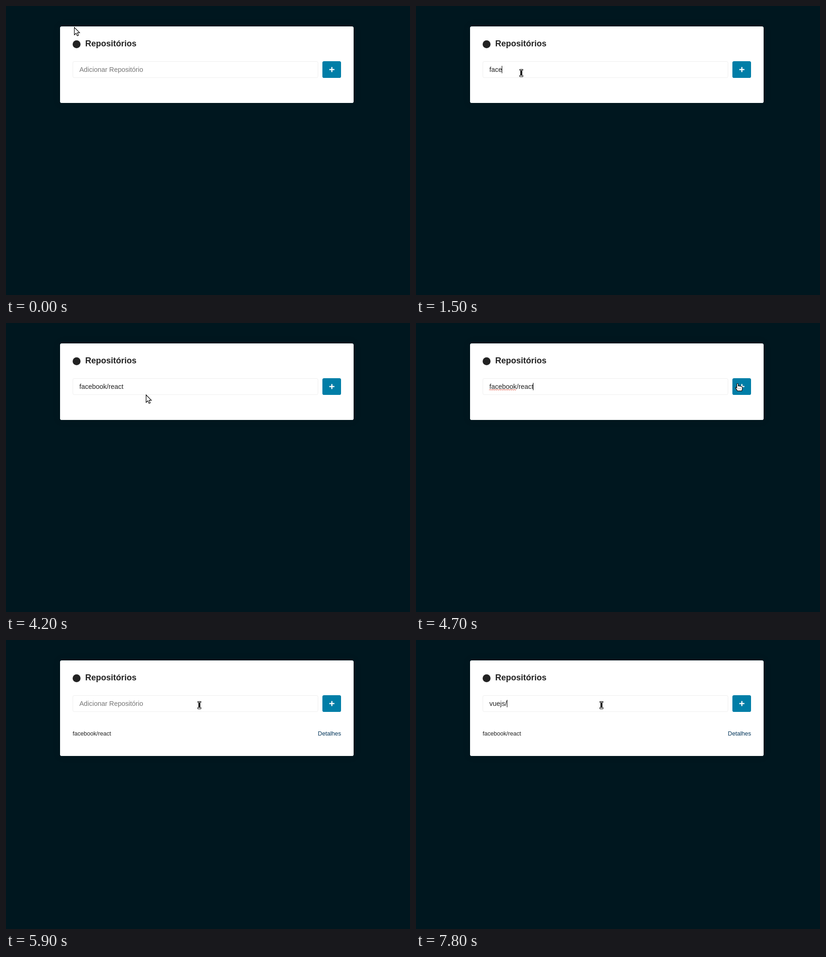
Recreate the animation shown at these times as an HTML page. Size 867x623 px, loop 8000 ms.

```html
<!DOCTYPE html>
<html lang="pt-BR">
<head>
<meta charset="utf-8">
<title>Repositórios</title>
<style>
  html, body { margin: 0; width: 100%; height: 100%; overflow: hidden; background: #00171f; }
  body { position: relative; font-family: "Liberation Sans", Arial, sans-serif; color: #222; }
  body * { position: absolute; box-sizing: border-box; margin: 0; white-space: pre; }
  svg * { position: static; }
  #card { left: 116px; top: 44px; width: 630px; height: 165px; background: #fff;
    border-radius: 3.6px; box-shadow: 0 0 18px rgba(0, 0, 0, .1); }
  #card.open { height: 206px; }
  #mark { left: 27px; top: 30px; width: 17px; height: 17px; border-radius: 50%; background: #222; }
  h1 { left: 54px; top: 27px; font-size: 18px; line-height: 20px; }
  #field { left: 27px; top: 75px; width: 527px; height: 36px; border: 1px solid #eee; border-radius: 3.6px; }
  #value { left: 41.5px; top: 85px; font-size: 14.4px; line-height: 16px; }
  #value.hint { color: #757575; }
  #caret { top: 85px; width: 1px; height: 16px; background: #000; }
  #squiggle { left: 41px; top: 98px; width: 59px; height: 4px; }
  #add { left: 563px; top: 75px; width: 40px; height: 36px; border-radius: 3.6px; background: #007ea7; }
  #add.busy { opacity: .6; }
  #add svg { left: 0; top: 0; width: 40px; height: 36px; fill: #fff; }
  #row { display: none; left: 27px; top: 151px; width: 576px; font-size: 12.6px; line-height: 14px; }
  .open #row { display: block; }
  #row a { right: 0; color: #003459; }
  #pointer { left: 0; top: 0; width: 24px; height: 24px; overflow: visible; }
</style>
</head>
<body>
<div id="card">
  <i id="mark"></i>
  <h1>Repositórios</h1>
  <div id="field"></div>
  <span id="value"></span>
  <svg id="squiggle"><path id="wave" fill="none" stroke="#e0452f" stroke-width=".9"/></svg>
  <i id="caret"></i>
  <div id="add">
    <svg>
      <g id="plus">
        <rect x="14.8" y="16.8" width="11" height="2.4" rx=".8"/>
        <rect x="19.1" y="12.5" width="2.4" height="11" rx=".8"/>
      </g>
      <g id="spinner"></g>
    </svg>
  </div>
  <div id="row">facebook/react<a>Detalhes</a></div>
</div>
<svg id="pointer">
  <g id="arrow">
    <path d="M.6 1V17.2L4.4 13.7 6.9 19.3 9.6 18.1 7.2 12.7H12Z" fill="#fff" stroke="#000" stroke-width="1.2"/>
  </g>
  <g id="beam">
    <path d="M-3.5-7.5H3.5V-5.5H1.5V5.5H3.5V8.5H-3.5V5.5H-1.5V-5.5H-3.5Z" fill="#fff" stroke="#000"/>
    <path d="M0-5.5V6" stroke="#000" stroke-width="2"/>
  </g>
  <g id="hand">
    <path d="M3.5 10V2Q3.5.5 5 .5T6.5 2V6Q8 4.8 9.3 6.3 11 5.3 12.2 7 15.4 6.3 15.4 9V12Q15.2 14 14 16.4H4.8Q3.5 13.5.8 10.5.3 8.3 2 8.5Z"
      fill="#fff" stroke="#000" stroke-width="1.2" stroke-linejoin="round"/>
    <path d="M5.5 10.5H13M5.5 12.5H13" stroke="#555" stroke-width=".8" stroke-dasharray="1 1"/>
  </g>
</svg>
<script>
const LOOP = 8000;
const $ = id => document.getElementById(id);
const show = (id, on) => { $(id).style.display = on ? '' : 'none'; };
const at = (list, t) => list.filter(e => e[0] <= t).pop();
const within = (t, a, b) => t >= a && t < b;

// Typed text: [start, value]
const typing = [
  [0, ''], [1200, 'f'], [1300, 'fa'], [1400, 'fac'], [1500, 'face'],
  [1700, 'faceb'], [1800, 'facebo'], [2000, 'facebook'], [3000, 'facebook/'],
  [3100, 'facebook/re'], [3200, 'facebook/rea'], [3300, 'facebook/reac'], [3500, 'facebook/react'],
  [5900, ''], [6800, 'v'], [7000, 'vue'], [7100, 'vuej'], [7400, 'vuejs'], [7800, 'vuejs/']
];

// Caret visibility: [from, to]
const caretOn = [[800, 2600], [3000, 4200], [4600, 5100], [6200, LOOP]];

// Pointer: [start, shape, x, y]
const moves = [[0, 'arrow', 146, 45]];
for (let k = 1; k <= 7; k++) {
  const p = k / 7, e = p * p * (3 - 2 * p);
  const y = Math.round(45 + 99 * e);
  moves.push([100 + k * 100, y > 119 ? 'beam' : 'arrow', Math.round(146 + 80 * e), y]);
}
moves.push(
  [4200, 'arrow', 300, 154], [4300, 'arrow', 510, 112], [4400, 'arrow', 635, 115],
  [4600, 'hand', 687, 128], [4700, 'hand', 685, 130], [4900, 'hand', 695, 139],
  [5600, 'arrow', 588, 160], [5800, 'beam', 447, 144], [5900, 'beam', 415, 140],
  [6100, 'beam', 405, 140], [6200, 'beam', 398, 140]
);

let wave = 'M0 3';
for (let x = 2; x <= 58; x += 2) wave += `L${x} ${x % 4 ? 1 : 3}`;
$('wave').setAttribute('d', wave);

// Seven dots on a ring, the upper right place is empty
for (let k = 0; k < 8; k++) {
  if (k === 7) continue;
  const a = k * Math.PI / 4;
  $('spinner').innerHTML += `<circle cx="${5.2 * Math.cos(a)}" cy="${5.2 * Math.sin(a)}" r="1.2"/>`;
}

function draw(t) {
  const text = at(typing, t)[1];
  const value = $('value');
  value.textContent = text || 'Adicionar Repositório';
  value.className = text ? '' : 'hint';

  const width = text ? value.getBoundingClientRect().width : 0;
  $('caret').style.left = Math.floor(41.5 + width) + 'px';
  show('caret', caretOn.some(([a, b]) => within(t, a, b)));
  show('squiggle', within(t, 4600, 5100));

  const busy = within(t, 5400, 5900);
  $('add').className = busy ? 'busy' : '';
  show('plus', !busy);
  show('spinner', busy);
  const turn = Math.floor((t - 5400) / 200) * 27;
  $('spinner').setAttribute('transform', `translate(20.2 18.2) rotate(${turn})`);

  $('card').className = t >= 5900 ? 'open' : '';

  const [, shape, x, y] = at(moves, t);
  for (const id of ['arrow', 'beam', 'hand']) show(id, id === shape);
  $('pointer').style.transform = `translate(${x}px, ${y}px)`;
}

function tick() {
  draw(performance.now() % LOOP);
  requestAnimationFrame(tick);
}
tick();
</script>
</body>
</html>
```
